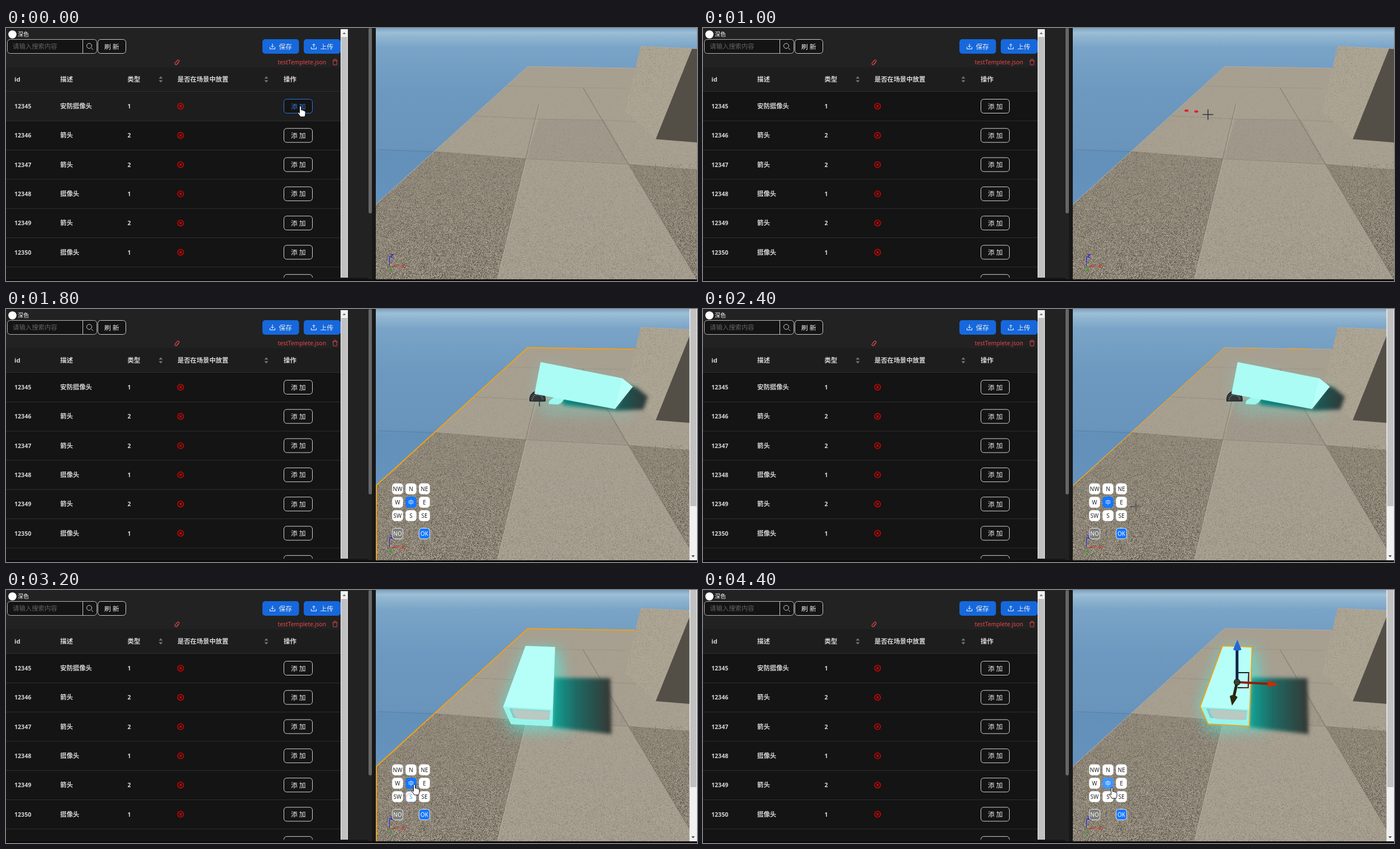
An HTML page with a canvas for the animation above (4.6 s loop, 1237 by 453 pixels).

```html
<!DOCTYPE html>
<html lang="zh">
<meta charset="utf-8">
<style>
html, body { margin: 0; width: 100%; height: 100%; overflow: hidden; background: #0b0b0b; }
canvas, svg { position: absolute; left: 0; top: 0; }
text { font: 600 11.4px "Noto Sans", "Noto Sans CJK SC", sans-serif; fill: #d6d6d6; }
.num { font-size: 10.6px; }
.bold { font-weight: 700; }
.btn { font-size: 11.8px; font-weight: 500; fill: #eee; }
.key text { font-size: 10px; font-weight: 400; text-anchor: middle; fill: #222; }
.key.on text { fill: #fff; }
.line { fill: none; stroke: #d0d0d0; }
.orange { fill: none; stroke: #f2a115; stroke-width: 2; }
</style>
<canvas id="scene" width="1237" height="453"></canvas>
<svg width="1237" height="453" viewBox="0 0 1237 453">
  <defs>
    <filter id="soft" x="-30%" y="-30%" width="160%" height="160%"><feGaussianBlur stdDeviation="3"/></filter>
    <filter id="glow" x="-60%" y="-60%" width="220%" height="220%"><feGaussianBlur stdDeviation="13"/></filter>
    <linearGradient id="shadeS"><stop offset="0" stop-color="#10a497"/><stop offset=".4" stop-color="#1f6a64"/><stop offset="1" stop-color="#353733"/></linearGradient>
    <linearGradient id="shadeE"><stop offset="0" stop-color="#0d8c82"/><stop offset=".6" stop-color="#16635f"/><stop offset="1" stop-color="#303735"/></linearGradient>
    <clipPath id="table"><rect width="599" height="447"/></clipPath>
  </defs>

  <!-- table side -->
  <rect width="662" height="450" fill="#222"/>
  <rect y="70" width="599" height="44" fill="#1d1d1d"/>
  <rect y="114" width="599" height="333" fill="#141414"/>
  <rect y="447" width="649" height="3" fill="#161616"/>
  <rect x="655" width="7" height="450" fill="#181818"/>
  <rect x="649" width="6" height="332" rx="3" fill="#676767"/>
  <circle cx="11.500" cy="11.500" r="7.300" fill="#fff"/>
  <text x="21" y="15" style="font-size:10px;font-weight:500;fill:#fff">深色</text>
  <rect x="2.500" y="20.500" width="160" height="25" rx="5" fill="#141414" stroke="#b5b5b5"/>
  <path class="line" d="M137.500 21v24M153 36l3 3"/>
  <circle class="line" cx="149" cy="32" r="4.500"/>
  <text x="12" y="37" style="font-weight:400;fill:#626262">请输入搜索内容</text>
  <rect x="164.500" y="20.500" width="50" height="25" rx="5" fill="#141414" stroke="#d0d0d0"/>
  <text x="176" y="37.500" class="btn">刷 新</text>
  <rect x="459" y="20" width="65.500" height="26" rx="5" fill="#1668dc"/>
  <rect x="533" y="20" width="66" height="26" rx="5" fill="#1668dc"/>
  <path class="line" d="M472.500 34v3.500h9V34M477 28v6.500m-2.500-2.500 2.500 2.500 2.500-2.500M546.500 34v3.500h9V34M551 35v-6.500m-2.500 2.500 2.500-2.500 2.500 2.500" style="stroke:#fff"/>
  <text x="488.500" y="37.500" class="btn">保存</text>
  <text x="562.500" y="37.500" class="btn">上传</text>
  <g fill="none" stroke="#dc4446">
    <path stroke-width="1.300" d="M309.500 61l-3.500 4a2 2 0 0 1-3.200-2.600l4-4.400a1.800 1.800 0 0 1 2.900 2.200l-3.700 4.200"/>
    <path d="M584.500 58.500h9M587 58v-2h4v2M585.500 59l.500 7h6l.500-7"/>
  </g>
  <text x="486.500" y="65" style="font-size:10.400px;font-weight:400;fill:#e84749">testTemplete.json</text>
  <g class="heads"></g>
  <g id="rows" clip-path="url(#table)"></g>
  <rect x="599" y="2" width="13" height="445" fill="#f1f1f1"/>
  <rect x="600" y="16" width="11" height="431" fill="#c1c1c1"/>
  <path d="M602.500 11h6l-3-3.500z" fill="#777"/>

  <!-- 3D side -->
  <path id="floorLine" class="orange" d="M663 450V316L934 69 1036 71 1126 72"/>
  <g id="camE">
    <path d="M946 152 956 98 1122 139 1120 190 960 190z" fill="#6cf0e2" opacity=".28" filter="url(#glow)"/>
    <path d="M990 152 1091 177 1115 136 1130 141 1149 157 1141 180 1095 182 998 172z" fill="url(#shadeE)" filter="url(#soft)"/>
    <path d="M937.500 165v-4a13.800 13.800 0 0 1 28 0v4z" fill="#33383a" stroke="#161a1b"/>
    <path d="M942 163a9.500 9.500 0 0 1 19 0" fill="none" stroke="#aaa" stroke-width="2" stroke-dasharray="1 2"/>
    <path d="M1000 160 1091 179 1088 176 1000 164z" fill="#0b9187"/>
    <path d="M984 156 1001 160 994 168 988 171 971 170 973 164z" fill="#9cf8ee"/>
    <path d="M957 95 1103 124 1122 139 1090 179 946 152z" fill="#abfcf4"/>
    <path d="M1103 124 1122 139 1090 179z" fill="#b9fff9"/>
  </g>
  <g id="camS">
    <path d="M890 205 930 105 990 105 1010 250 904 252z" fill="#4df5e4" opacity=".6" filter="url(#glow)"/>
    <path d="M981 157 1082 158 1084 258 978 246z" fill="url(#shadeS)" filter="url(#soft)"/>
    <path d="M930 100 983 102 979 214 978 244 904 240 890 209z" fill="#b6fff8"/>
    <path d="M890 209 979 214 978 244 904 240z" fill="#98f5ec"/>
    <path d="M901 212 974 216 972 232 908 229z" fill="#7ccfc8"/>
    <path d="M906 213 973 217q2 12-6 16l-48-2q-10-3-13-18z" fill="#b9c9c3"/>
  </g>
  <g id="gizmo">
    <path class="orange" d="M930 100 983 102 979 214 978 244 904 240 890 209z"/>
    <path d="M958 148h19l-1 27h-19" fill="none" stroke="#17202a" stroke-width="2"/>
    <path d="M977 148l-1 27h-10" fill="none" stroke="#6b1b10" stroke-width="2"/>
    <path d="M956 165V106" stroke="#0b2445" stroke-width="5"/>
    <path d="M956.500 89 964 107q-7 3-15 0z" fill="#2467d8"/>
    <path d="M956 165 1013 168" stroke="#8e1d0c" stroke-width="4"/>
    <path d="M1031 169 1012 162q-3 6 0 12z" fill="#c0300f"/>
    <path d="M956 165 950 192" stroke="#242408" stroke-width="5"/>
    <path d="M947 207 943 190q7-5 14 2z" fill="#2a2a0b"/>
    <circle cx="956" cy="165" r="6" fill="#22291f"/>
    <path d="M952 163h8M952 167h8M954 161v8M958 161v8" stroke="#637268" stroke-width=".7"/>
  </g>
  <g id="trail" fill="#c92f36" stroke="#ef1717">
    <rect x="862.500" y="146.500" width="6" height="3" rx="1"/><rect x="880" y="148" width="6" height="3" rx="1"/>
  </g>
  <g fill="none">
    <path d="M686.500 426v-18" stroke="#1717e6"/>
    <path d="M687 426.500h18" stroke="#e22"/>
    <path d="M687 427l2 3" stroke="#1b1"/>
  </g>
  <text x="688" y="411" style="font-size:9px;fill:#1717e6">Z</text>
  <text x="708" y="429.500" style="font-size:9px;fill:#e22">X</text>
  <text x="686" y="437" style="font-size:8px;fill:#1b1">Y</text>
  <g id="pad"></g>
  <g id="bar">
    <rect x="1223.500" width="13.500" height="450" fill="#f1f1f1"/>
    <rect x="1225" width="11" height="353" fill="#c1c1c1"/>
    <path d="M1227 441h6l-3 3.500z" fill="#444"/>
  </g>
  <circle id="ring" r="11" fill="none" stroke="#e23c3c" stroke-width="2.500"/>
  <g id="cursor">
    <path id="hand" d="M-1.500 1.500q0-1.700 1.500-1.700t1.500 1.700V7q2-1 2.800.600 2-.600 2.500 1 2-.300 2.200 1.400V14q0 2-1.500 5H0q-1.500-3-5-7 1.200-2 3.500.500z" fill="#fff" stroke="#111"/>
    <path id="arrow" d="M0 0v14l3.500-3 2.500 5 2-1-2.300-5H10z" fill="#fff" stroke="#111"/>
    <path id="cross" d="M-9.500 0h19M0-9.500v19" stroke="#2d3538" stroke-width="1.500"/>
  </g>
</svg>
<script>
const $ = id => document.getElementById(id);
const show = (id, on) => $(id).style.display = on ? '' : 'none';

// Static 3D backdrop
const g = $('scene').getContext('2d');
function trace(points) {
  g.beginPath();
  points.forEach(([x, y]) => g.lineTo(x, y));
}
function shape(points, fill) {
  trace(points);
  g.fillStyle = fill;
  g.fill();
}
function seam(points, color, width) {
  trace(points);
  g.strokeStyle = color;
  g.lineWidth = width;
  g.stroke();
}
let seed = 7;
const rand = () => (seed = seed * 16807 % 2147483647) / 2147483647;
function speck(x, y, strength) {
  g.fillStyle = rand() < .55 ? `rgba(25,20,14,${strength})` : `rgba(230,221,205,${strength})`;
  g.fillRect(x | 0, y | 0, 1, 1);
}

g.beginPath();
g.rect(662, 0, 575, 450);
g.clip();
const sky = g.createLinearGradient(0, 0, 0, 320);
[[0, '#7ba3c2'], [.025, '#9dbfd6'], [.05, '#90b5d0'], [.11, '#7aa4c7'], [.35, '#6d99c0'], [.67, '#6994bc'], [.7, '#6290b9'], [1, '#6693bd']]
  .forEach(([at, color]) => sky.addColorStop(at, color));
g.fillStyle = sky;
g.fillRect(662, 0, 575, 450);
seam([[666, 218], [775, 222]], '#5680a5', 1);

const floor = [[934, 69], [1237, 74], [1237, 450], [662, 450], [662, 316]];
g.save();
shape(floor, '#a79f90');
g.clip();
shape([[765, 221], [930, 234], [878, 450], [662, 450], [662, 316]], '#8f8778');
shape([[1115, 244], [1237, 254], [1237, 450]], '#8d8576');
shape([[954, 163], [1072, 165], [1115, 244], [930, 234]], '#a0988a');
for (let i = 0; i < 75000; i++) {
  const x = 662 + rand() * 575, y = 70 + 380 * Math.sqrt(rand());
  const left = x < 930 - (y - 234) * .242 && y > 221 + (x - 765) * .079;
  const right = x > 1115 + (y - 244) * .592 && y > 244;
  speck(x, y, (left || right ? .36 : .12) * (y + 60) / 510);
}
seam([[954, 135], [930, 235], [878, 450]], 'rgba(95,88,76,.4)', 1.2);
seam([[956, 135], [932, 235], [880, 450]], 'rgba(200,191,175,.35)', 1);
seam([[1033, 107], [1115, 245], [1237, 450]], 'rgba(95,88,76,.45)', 1.3);
seam([[765, 221], [930, 234], [1115, 244], [1237, 254]], 'rgba(110,102,90,.35)', 1);
seam([[832, 157], [954, 163], [1075, 165], [1130, 168]], 'rgba(110,102,90,.3)', 1);
seam([[895, 104], [1040, 107], [1110, 108]], 'rgba(110,102,90,.2)', 1);
g.restore();
seam([[662, 316], [934, 69], [1126, 72]], '#b8ad9d', 1);
shape([[1228, 37], [1237, 37], [1237, 205], [1163, 199]], '#544f46');
g.save();
shape([[1136, 33], [1228, 37], [1163, 199], [1108, 149]], '#aca493');
g.clip();
for (let i = 0; i < 6000; i++) speck(1108 + rand() * 120, 33 + rand() * 166, .1);
g.restore();
seam([[1136, 33], [1237, 37]], '#b4ab9c', 1);

// Table
const columns = [15, 97, 217.5, 307, 497];
document.querySelector('.heads').innerHTML =
  ['id', '描述', '类型', '是否在场景中放置', '操作']
    .map((s, i) => `<text class="bold" x="${columns[i]}" y="96">${s}</text>`).join('') +
  [277, 466].map(x => `<path d="M${x - 3.5} 90.500l3.500-4 3.500 4zM${x - 3.5} 93.500l3.500 4 3.500-4z" fill="#777"/>`).join('') +
  '<path d="M0 113.500h599" stroke="#303030"/>';
const kinds = [['安防摄像头', 1], ['箭头', 2], ['箭头', 2], ['摄像头', 1], ['箭头', 2], ['摄像头', 1], ['箭头', 2]];
$('rows').innerHTML = kinds.map(([name, type], i) => `
  <g transform="translate(0 ${140 + i * 52.3})">
    <rect class="hover" y="-26" width="599" height="52" fill="none"/>
    <path d="M0 26.300h599" stroke="#303030"/>
    <text class="num" x="15" y="4">${12345 + i}</text>
    <text class="bold" x="97" y="4">${name}</text>
    <text class="num" x="217.500" y="4">${type}</text>
    <g fill="none" stroke="#f00000" stroke-width="1.300"><circle cx="312.500" r="5.300"/><path d="M310.300-2.200l4.400 4.400m0-4.400-4.400 4.400"/></g>
    <rect class="box" x="497.500" y="-12.500" width="51" height="25" rx="5" fill="#141414" stroke="#d6d6d6"/>
    <text class="btn" x="510" y="4.500">添 加</text>
  </g>`).join('');
const hover = document.querySelector('.hover'), box = document.querySelector('.box');
const label = document.querySelector('#rows .btn');

// Direction pad
const keys = ['NW', 'N', 'NE', 'W', '中', 'E', 'SW', 'S', 'SE', 'NO', '', 'OK'];
$('pad').innerHTML = keys.map((s, i) => {
  if (!s) return '';
  const x = 701 + i % 3 * 24, y = i > 8 ? 402 : 322 + (i / 3 | 0) * 24;
  const on = i == 4 || i > 8;
  const fill = s == 'NO' ? '#7f7f7b' : on ? '#1677ff' : '#fff';
  const edge = i > 8 ? '#eee' : on ? '#1677ff' : '#e4e4e4';
  return `<g class="key ${on ? 'on' : ''}" id="key${i}"><rect x="${x - 9.5}" y="${y - 9.5}" width="19" height="19" rx="5" fill="${fill}" stroke="${edge}"/><text x="${x}" y="${y + 3.7}">${s}</text></g>`;
}).join('');
function paintKey(i, fill, edge, ink) {
  const [rect, text] = $('key' + i).children;
  rect.setAttribute('fill', fill);
  rect.setAttribute('stroke', edge);
  text.style.fill = ink;
}

// [time, pointer, x, y]
const path = [
  [0, 'hand', 527, 140], [800, 'arrow', 575, 146], [1000, 'cross', 904, 155],
  [1200, 'cross', 940, 162], [1400, 'cross', 955, 165], [2000, 'cross', 940, 184],
  [2200, 'cross', 864, 262], [2400, 'cross', 775, 354], [2600, 'hand', 737, 374],
  [2800, 'hand', 728, 368], [3200, 'hand', 731, 348], [3400, 'hand', 729, 341],
  [3600, 'hand', 728, 338], [4000, 'hand', 730, 346], [4400, 'hand', 732, 354]];
// [time, x, y, opacity]
const clicks = [[600, 528, 142, .8], [1400, 955, 165, .8], [3000, 727, 372, .7], [3200, 727, 374, .2], [3600, 728, 340, .8]];

function draw(now) {
  const t = Math.floor(now % 4600 / 200) * 200;
  const [, pointer, x, y] = path.findLast(p => p[0] <= t);
  ['hand', 'arrow', 'cross'].forEach(id => show(id, id == pointer));
  $('cursor').setAttribute('transform', `translate(${x} ${y})`);
  $('cross').style.opacity = t == 2400 ? .5 : 1;

  const click = clicks.find(c => c[0] == t);
  show('ring', click);
  if (click) {
    $('ring').setAttribute('transform', `translate(${click[1]} ${click[2]})`);
    $('ring').style.opacity = click[3];
  }

  const overButton = t < 800;
  hover.setAttribute('fill', t < 1000 ? '#1d1d1d' : 'none');
  box.setAttribute('stroke', overButton ? '#2a7be4' : '#d6d6d6');
  label.style.fill = overButton ? '#2a7be4' : '';

  show('trail', t == 1000);
  show('camE', t >= 1400 && t < 3000);
  show('camS', t >= 3000);
  show('gizmo', t >= 3600);
  show('pad', t >= 1600);
  show('bar', t >= 1600);
  show('floorLine', t >= 1600 && t < 3600);
  const thin = t == 2400;
  $('floorLine').style.strokeWidth = thin ? 1.2 : 2;
  $('floorLine').style.strokeDasharray = thin ? '0 134 368 30 30 50 40 99' : '';

  const blue = t >= 2600 && t <= 3200;
  paintKey(7, '#fff', blue ? '#69b1ff' : '#e4e4e4', blue ? '#4096ff' : '#222');
  const mid = t >= 3400 ? '#4096ff' : '#1677ff';
  paintKey(4, mid, mid, '#fff');
  requestAnimationFrame(() => draw(performance.now()));
}
draw(0);
</script>
</html>
```
